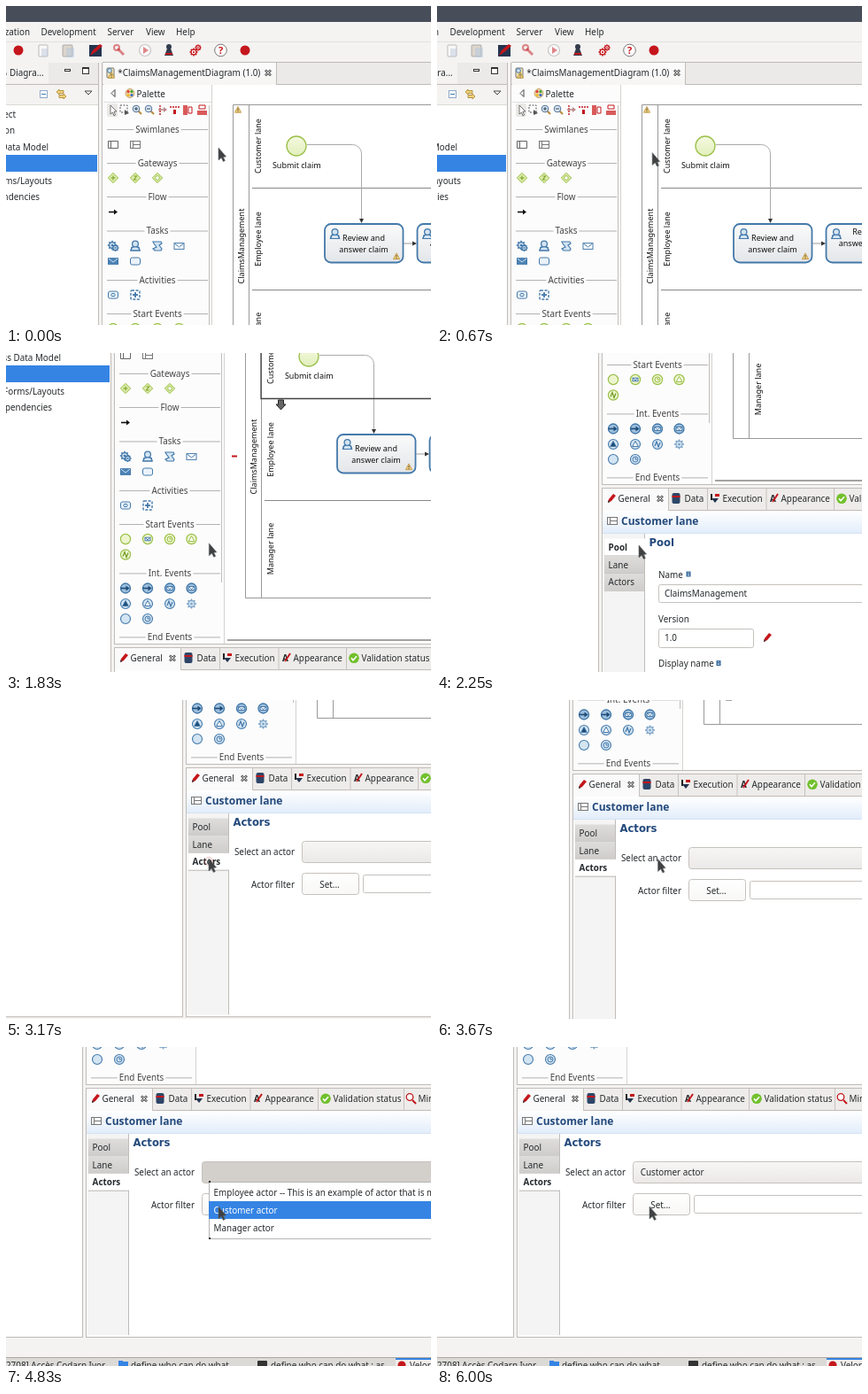
An HTML page with a canvas that plays this animation: 480 px wide and 360 px high, repeating every 6080 ms.

```html
<!DOCTYPE html>
<html lang="en">
<head>
<meta charset="utf-8">
<title>Mapping an actor to a lane</title>
<style>
html, body { margin: 0; width: 100%; height: 100%; overflow: hidden; background: #fff; }
canvas { display: block; }
</style>
</head>
<body>
<canvas id="stage" width="480" height="360"></canvas>
<script>
const g = document.getElementById('stage').getContext('2d');
const LOOP = 6080, SELECT = 1240, ACTORS = 3080, OPEN = 4080, CLOSE = 5080;
const INK = '#262a2d', NAVY = '#244a7c', BLUE = '#3584e4', RED = '#c4161c', EDGE = '#c0bcb8', BG = '#f4f3f2';
const STEEL = '#4479aa', ICE = '#d3e4f2', GREEN = '#9bc04a', LIME = '#edf5cf';

// time, x, y
const camera = [[0, 0, 0], [1250, 46, 0], [1400, 46, 0], [2250, -78, 334], [3000, -95, 410],
  [3300, -95, 410], [4080, 15, 395], [4220, 15, 395], [4800, 18, 440]];
const pointer = [[0, 240, 160], [1150, 285.5, 169], [1350, 285.5, 169], [2250, 150, 551], [2900, 134, 589],
  [3250, 134, 589], [4000, 255, 578], [4190, 255, 578], [4750, 258, 620]];
const clicks = [[SELECT, 1410], [ACTORS, 3240], [3990, OPEN], [4990, CLOSE]];

// monotone cubic through the keys
function at(keys, t, k) {
  const last = keys.length - 1;
  if (t >= keys[last][0]) return keys[last][k];
  const slope = i => (keys[i + 1][k] - keys[i][k]) / (keys[i + 1][0] - keys[i][0]);
  const tangent = i => {
    if (i === 0 || i === last) return 0;
    const a = slope(i - 1), b = slope(i);
    return a * b > 0 ? 2 * a * b / (a + b) : 0;
  };
  let i = 0;
  while (keys[i + 1][0] <= t) i++;
  const h = keys[i + 1][0] - keys[i][0], u = (t - keys[i][0]) / h, v = 1 - u;
  return keys[i][k] * (1 + 2 * u) * v * v + tangent(i) * h * u * v * v
    + keys[i + 1][k] * u * u * (3 - 2 * u) - tangent(i + 1) * h * u * u * v;
}

function box(x, y, w, h, color) { g.fillStyle = color; g.fillRect(x, y, w, h); }

function paint(fill, stroke, width = 1) {
  if (fill) { g.fillStyle = fill; g.fill(); }
  if (stroke) { g.strokeStyle = stroke; g.lineWidth = width; g.stroke(); }
}
function round(x, y, w, h, r, fill, stroke, width) {
  g.beginPath(); g.roundRect(x, y, w, h, r); paint(fill, stroke, width);
}
function dot(x, y, r, fill, stroke, width) {
  g.beginPath(); g.arc(x, y, r, 0, 7); paint(fill, stroke, width);
}
// points relative to x, y
function shape(x, y, pts, fill, stroke, width) {
  g.beginPath();
  for (let i = 0; i < pts.length; i += 2) g.lineTo(x + pts[i], y + pts[i + 1]);
  if (fill) g.closePath();
  paint(fill, stroke, width);
}
function fade(y0, y1, a, b) {
  const f = g.createLinearGradient(0, y0, 0, y1);
  f.addColorStop(0, a); f.addColorStop(1, b);
  return f;
}
// y is the middle of the capitals
function text(s, x, y, { size = 9.9, bold = false, color = INK, align = 'left', face = 'Noto Sans' } = {}) {
  g.font = `${bold ? 'bold ' : ''}${size}px "${face}", sans-serif`;
  g.fillStyle = color;
  g.textAlign = align;
  g.fillText(s, x, y + size * .36);
}
function upright(s, x, y) {
  g.save(); g.translate(x, y); g.rotate(-Math.PI / 2);
  text(s, 0, 0, { size: 9, align: 'center', color: '#111' });
  g.restore();
}

function cross(x, y) {
  shape(x, y, [-3, -3, 3, 3], null, '#444', 2.6); shape(x, y, [-3, 3, 3, -3], null, '#444', 2.6);
  shape(x, y, [-2.6, -2.6, 2.6, 2.6], null, '#fff', 1); shape(x, y, [-2.6, 2.6, 2.6, -2.6], null, '#fff', 1);
}
function gear(x, y, r, color, hub = '#fff') {
  for (let i = 0; i < 8; i++) {
    const a = i * Math.PI / 4;
    shape(x, y, [0, 0, r * Math.cos(a), r * Math.sin(a)], null, color, 1.6);
  }
  dot(x, y, r * .65, hub, color, 1.2); dot(x, y, r * .25, color);
}
function pencil(x, y, color = RED) {
  shape(x, y, [-4, 5, -3, 1, 2, -5, 5, -3, 0, 3], color);
  shape(x, y, [-4, 5, -3.4, 2, -1.5, 4], '#333');
}
function user(x, y) {
  shape(x, y, [-5, 5.5, -4, 2, -1, 1, 1, 1, 4, 2, 5, 5.5], ICE, STEEL, 1.2);
  g.stroke(); dot(x, y - 2, 3.4, ICE, STEEL, 1.3);
}
function warn(x, y) {
  shape(x, y, [0, -3.6, 3.6, 3.2, -3.6, 3.2], '#f3d27a', '#b98f3c', .8);
  box(x - .5, y - 1.5, 1, 2.5, '#554'); box(x - .5, y + 1.6, 1, 1, '#554');
}
function mail(x, y, fill, r = 6) {
  const h = r * .65;
  box(x - r, y - h, 2 * r, 2 * h, STEEL); box(x - r + 1, y - h + 1, 2 * r - 2, 2 * h - 2, fill);
  shape(x, y, [1 - r, 1 - h, 0, 1, r - 1, 1 - h], null, fill === '#fff' ? STEEL : '#cfe2f3');
}
function lanes(x, y) {
  box(x - 6, y - 4, 12, 9, '#777'); box(x - 5, y - 3, 2, 7, '#fff');
  box(x - 2, y - 3, 7, 3, '#fff'); box(x - 2, y + 1, 7, 3, '#fff');
}
function info(x, y) {
  box(x - 2.5, y - 3, 5, 6, '#3c6e9f'); box(x - .5, y - 2, 1, 1, '#fff'); box(x - .5, y, 1, 2, '#fff');
}
function zigzag(x, y, color) { shape(x, y, [-3, 2, -1, -3, 1, 3, 3, -2], null, color, 1.2); }
function clock(x, y, color) { dot(x, y, 3, null, color); shape(x, y, [0, -2, 0, 0, 2, 0], null, color); }
function arrow(x, y, color) {
  shape(x, y, [-5, 0, 3, 0], null, color, 1.6); shape(x, y, [1, -3, 5, 0, 1, 3], color);
}

function menus(on) {
  box(-120, 0, 900, 18, '#474e5a');
  box(-120, 18, 900, 46, BG);
  box(-120, 40, 900, 1, '#e4e1de');
  text('Organization', 27, 29, { align: 'right' });
  [['Development', 39.5], ['Server', 114.5], ['View', 158], ['Help', 192]].forEach(m => text(m[0], m[1], 29));
  dot(14, 50, 5.5, RED);
  g.globalAlpha = .45;
  round(37, 44, 10, 13, 1, '#fff', '#777'); box(40, 48, 7, 9, '#b7c3d8');
  g.globalAlpha = on ? .8 : .5;
  round(64, 44, 11, 13, 1, '#c7b9a5', '#777'); box(68, 47, 9, 11, '#b3c7df');
  g.globalAlpha = 1;
  box(94, 44, 14, 13, '#24344f'); shape(101, 50, [-6, 6, -3, 0, 5, -7, 8, -5, 0, 2], RED);
  g.globalAlpha = on ? 1 : .5;
  shape(128, 50, [-2, -2, 5, 5], null, RED, 3); dot(125, 47, 3, null, RED, 2);
  dot(157, 50, 6.5, '#fff', on ? RED : '#999', 1.2); shape(157, 50, [-2, -4, 4, 0, -2, 4], RED);
  g.globalAlpha = 1;
  shape(184, 50, [-2, -2, 2, -2, 5, 6, -5, 6], '#333c4c'); dot(184, 46, 3, '#333c4c'); box(180, 53, 8, 2, RED);
  gear(212, 52, 4.5, RED); gear(217, 47, 3.5, RED);
  dot(242.5, 50, 6.8, '#fff', '#777'); text('?', 242.5, 50, { bold: true, color: RED, align: 'center', size: 11 });
  dot(270, 50, 5.5, RED);
}

function explorer() {
  box(-120, 64, 225, 704, '#fff');
  box(-120, 64, 225, 25, '#eceae8'); box(-120, 64, 168, 25, BG);
  text('Diagra...', 4, 75); shape(-2, 74, [0, -4, 2, 4], null, '#666', 2);
  box(66, 71, 7, 3, '#333'); box(67, 72, 5, 1, '#fff');
  box(86, 69, 8, 8, '#333'); box(87, 71, 6, 5, '#fff');
  box(-120, 88, 225, 1, EDGE); box(-120, 89, 225, 22, BG); box(-120, 111, 225, 1, '#dcd9d6');
  box(38, 95, 9, 9, '#8ea9c9'); box(39, 96, 7, 7, '#fff'); box(40, 99, 5, 1, STEEL);
  shape(61, 97, [-4, 0, -1, -3, -1, -1.5, 4, -1.5, 4, 1.5, -1, 1.5, -1, 3], '#f2d27a', '#a8802d', .8);
  shape(64, 102, [4, 0, 1, -3, 1, -1.5, -4, -1.5, -4, 1.5, 1, 1.5, 1, 3], '#f2d27a', '#a8802d', .8);
  shape(93, 98, [-4, -2, 4, -2, 0, 2], '#fff', '#444');
  box(-120, 168, 223, 19, BLUE);
  [['Project', 11, 122], ['Organization', 10, 140.5], ['Business Data Model', 48, 159],
    ['Pages/Forms/Layouts', 52, 197], ['Dependencies', 38, 215.5]]
    .forEach(r => text(r[0], r[1], r[2], { align: 'right' }));
  box(104, 64, 1, 704, EDGE); box(-120, 767, 225, 1, EDGE);
}

function heading(s, y) {
  text(s, 171, y, { align: 'center', color: '#444' });
  const half = g.measureText(s).width / 2 + 2;
  box(114, y, 57 - half, 1, '#b2b2b2'); box(171 + half, y, 57 - half, 1, '#b2b2b2');
}

function palette() {
  box(110, 89, 123, 393, '#fcfcfc');
  shape(121, 98.5, [2, -4, -2, 0, 2, 4], '#fff', '#444');
  dot(140, 98.5, 5, '#e8d3a4', '#c9a76d');
  [['#d33', -2, -2], ['#3a3', 2, -2], ['#36c', 2, 2], ['#eb2', -2, 2]].forEach(c => dot(140 + c[1], 98.5 + c[2], 1.5, c[0]));
  text('Palette', 147.5, 99.2);
  box(110, 108, 122, 1, '#e0dedb');
  round(114, 110, 12, 15, 2, '#eae8e5');
  shape(118, 112, [0, 0, 0, 10, 2.5, 8, 4, 12, 5.5, 11, 4, 7, 7, 7], '#fff', '#555', .8);
  g.setLineDash([2, 1.5]); round(129, 112, 8, 8, 0, null, '#555'); g.setLineDash([]);
  shape(134, 117, [0, 0, 0, 6, 5, 4], '#555');
  [148, 162].forEach((x, i) => {
    shape(x, 117, [1, 1, 5, 5], null, '#b88a3c', 2); dot(x - 1, 116, 3.8, '#dceaf7', '#4f6f94');
    box(x - 3, 115.5, 4, 1, '#345'); if (!i) box(x - 1.5, 114, 1, 4, '#345');
  });
  g.setLineDash([2, 1]); shape(174, 112, [0, 0, 0, 11], null, RED, 1.4); shape(185, 114, [0, 0, 11, 0], null, RED, 1.4); g.setLineDash([]);
  arrow(177, 117, '#b88'); box(189, 117, 3, 5, RED);
  box(200, 112, 5, 11, '#d95b5b'); round(206, 114, 4, 7, 0, '#fff', RED);
  box(216, 118, 11, 5, '#d95b5b'); round(218, 112, 7, 4, 0, '#fff', RED);

  heading('Swimlanes', 139);
  round(115.5, 152.5, 11, 8, 0, '#fff', '#666'); box(118, 152, 1, 9, '#666');
  lanes(146, 156);
  heading('Gateways', 177);
  [121, 146, 171].forEach((x, i) => {
    shape(x, 194, [0, -5.7, 5.7, 0, 0, 5.7, -5.7, 0], '#dcebaa', GREEN);
    if (i === 2) dot(x, 194, 2.3, '#fff', GREEN);
    else shape(x, 194, i ? [-1.5, -2, 1.5, -2, -1.5, 2, 1.5, 2] : [-2.5, 0, 2.5, 0], null, '#7da52a', 1.1);
    if (!i) shape(x, 194, [0, -2.5, 0, 2.5], null, '#7da52a', 1.1);
  });
  heading('Flow', 215);
  arrow(121, 232.5, '#111');
  heading('Tasks', 253.5);
  gear(120, 270, 5.2, STEEL, ICE); gear(123.5, 273, 4, STEEL, ICE);
  user(146, 270.5);
  shape(171, 271, [-5, -5, 4, -5, 5, -3, 2, -1, 5, 3, 4, 5, -3, 5, -5, 3, -1, 1, -4, -3], ICE, STEEL, 1.2);
  mail(195.5, 271, '#fff'); mail(121, 288, '#4c83b5');
  round(140.5, 284, 11, 8, 2, '#eaf3fa', STEEL);
  heading('Activities', 309);
  round(115.5, 322, 11, 8, 2, '#eaf3fa', STEEL); round(119, 324.5, 4, 3, 1, null, STEEL);
  g.setLineDash([3, 1.5]); round(141, 321, 10, 10, 1, '#fff', STEEL, 1.4); g.setLineDash([]);
  shape(146, 326, [-3, 0, 3, 0], null, STEEL, 1.8); shape(146, 326, [0, -3, 0, 3], null, STEEL, 1.8);

  heading('Start Events', 347);
  const cols = [121, 146, 171, 195.5];
  cols.forEach(x => dot(x, 364, 5.6, LIME, GREEN, 1.2));
  mail(146, 364, '#fff', 3.5); clock(171, 364, GREEN);
  shape(195.5, 364, [0, -3.5, 3.3, 2.5, -3.3, 2.5], '#fff', GREEN);
  dot(121, 381.5, 5.6, LIME, GREEN, 1.2); zigzag(121, 381.5, '#6f9a20');
  heading('Int. Events', 402.4);
  cols.forEach((x, i) => {
    dot(x, 419.5, 5.5, '#9dbfdd', '#3f75a6', 1.3);
    if (i < 2) arrow(x - .5, 419.5, '#1f4c78'); else mail(x, 419.5, '#fff', 3.8);
    if (i < 3) dot(x, 437, 5.5, ICE, STEEL, 1.1); else gear(x, 437, 5.5, '#7ea4c6', ICE);
    if (i < 2) {
      shape(x, 437, [0, -3.5, 3.3, 2.5, -3.3, 2.5], i ? '#fff' : '#1f4c78', STEEL);
      dot(x, 454, 5.5, ICE, STEEL, 1.1);
    }
  });
  zigzag(171, 437, STEEL); clock(146, 454, STEEL);
  heading('End Events', 474.4);
  box(229, 112, 1, 301, '#c2bfbc');
  box(232, 89, 1, 393, '#d6d3d0');
}

function task(x, w, cx, lines, y) {
  round(x, 246, w, 43.5, 7, fade(246, 290, '#fafafa', '#e3e6e9'), STEEL, 1.8);
  user(x + 11.5, 257);
  lines.forEach((s, i) => text(s, cx, y + 12.8 * i, { size: 9, align: 'center', color: '#111' }));
}

function diagram(t) {
  box(233, 89, 560, 393, '#fff');
  round(256.5, 111.5, 522, 319, 0, '#fff', '#999');
  box(274, 111, 1, 320, '#999');
  box(278, 205, 500, 1, '#888'); box(278, 320, 500, 1, '#888');
  upright('ClaimsManagement', 265.5, 271);
  upright('Customer lane', 284.5, 158);
  upright('Employee lane', 284.5, 263);
  upright('Manager lane', 284.5, 375);
  warn(262, 117);
  g.beginPath(); g.moveTo(340, 156.5); g.lineTo(391, 156.5); g.arcTo(401.5, 156.5, 401.5, 167, 10); g.lineTo(401.5, 242);
  paint(null, '#aaa');
  shape(401.5, 245, [0, 0, -2.5, -5, 2.5, -5], '#333');
  dot(328, 158, 11, fade(147, 169, '#f4f9e0', '#e2efbb'), GREEN, 1.3);
  text('Submit claim', 328.3, 180, { size: 9, align: 'center', color: '#111' });
  task(360, 88.5, 404, ['Review and', 'answer claim'], 261.5);
  warn(441, 282.5);
  shape(449, 268, [0, 0, 11, 0], null, '#999'); shape(464, 268, [0, 0, -5, -2.5, -5, 2.5], '#333');
  task(464.5, 97, 513, ['Read the', 'answer and rate', 'it'], 255);
  if (t >= SELECT) {
    round(274, 111.5, 504, 94, 0, null, '#444', 1.3);
    box(524, 204, 4, 4, '#222');
    shape(296.5, 212, [-3, -5, 3, -5, 3, 0, 5.5, 0, 0, 6, -5.5, 0, -3, 0], '#666', '#222');
    box(241, 269.5, 6, 2, RED);
  }
  // overlay scrollbar, hidden again once the pointer has left
  if (t > 1500 && t < 2700) box(236, 477, 540, 2, '#a5a2a0');
}

function editor(t) {
  box(109, 64, 680, 419, '#fff');
  box(109, 64, 680, 25, '#eceae8'); box(109, 63, 680, 1, EDGE); box(109, 88, 680, 1, EDGE);
  box(110, 64, 196, 25, fade(64, 89, '#fbfbfb', '#f6f5f4')); box(305, 64, 1, 25, EDGE);
  round(114, 70, 8, 11, 1, '#f6e6b4', '#777'); dot(117, 73, 2.4, ICE, STEEL); warn(119, 78);
  text('*ClaimsManagementDiagram (1.0)', 126.3, 75.3);
  cross(296, 75.3);
  palette();
  diagram(t);
  box(108, 64, 1, 419, EDGE); box(109, 482, 680, 1, EDGE);
}

function field(x, y, w, h) { round(x + .5, y + .5, w, h, 2, '#fff', '#c5c1bd'); }

function poolPage() {
  text('Name', 172, 584); info(206, 583.5);
  field(172, 595, 600, 20); text('ClaimsManagement', 179, 605.5);
  text('Version', 172, 634);
  field(172, 645, 107, 21); text('1.0', 179, 655.5); pencil(295, 655);
  text('Display name', 172, 684.5); info(240, 684);
  field(172, 695, 600, 20);
}

function actorsPage(t, py) {
  const open = t >= OPEN && t < CLOSE;
  text('Select an actor', 231, 581.5, { align: 'right' });
  round(239.5, 569.5, 540, 24, 3, open ? '#d3cfcb' : fade(569, 594, '#f7f6f5', '#ebe9e7'), '#c5c1bd');
  if (t >= CLOSE) text('Customer actor', 247.7, 581.5);
  text('Actor filter', 231, 618, { align: 'right' });
  round(239.5, 605.5, 64, 24, 3, fade(605, 630, '#fff', '#f8f7f6'), '#c5c1bd');
  text('Set...', 270.5, 618, { align: 'center' });
  field(308, 607, 470, 20);
  if (!open) return;
  box(247, 592, 540, 65, '#b5b5b5'); box(248, 593, 540, 63, '#fff');
  box(247, 591, 2, 2, '#111'); box(247, 655, 2, 2, '#111');
  const row = py > 614 ? 1 : 0;
  box(247, 594 + 20 * row, 541, 20, BLUE);
  ['Employee actor -- This is an example of actor that is mapped by default', 'Customer actor', 'Manager actor']
    .forEach((s, i) => text(s, 252.6, 604 + 20.2 * i, { color: i === row ? '#fff' : INK }));
}

function properties(t, py) {
  const actors = t >= ACTORS;
  box(108, 486, 680, 282, '#fff');
  box(108, 486, 680, 26, '#eeecea'); box(109, 487, 74, 25, '#fafafa');
  box(108, 486, 680, 1, EDGE); box(183, 511, 600, 1, EDGE);
  [183, 227, 293.5, 370, 467].forEach(x => box(x, 487, 1, 25, '#c5c1bd'));
  [['General', 126.5], ['Data', 201.5], ['Execution', 244.5], ['Appearance', 310.5], ['Validation status', 387.5], ['Minimap', 483.5]]
    .forEach(s => text(s[0], s[1], 498.3));
  pencil(119, 498); cross(174, 498.3);
  round(187.5, 492, 9, 12, 2, '#2d4668'); box(187.5, 495, 9, 2, RED);
  shape(232, 498, [0, -5, 0, 2], null, '#222', 2); shape(236, 498, [-4, 0, 4, 0, 0, 5], '#24344f'); box(236, 493, 5, 3, RED);
  text('A', 298, 498.3, { bold: true }); shape(304, 498, [-3, 4, 3, -5], null, RED, 2);
  dot(379, 498.3, 5.8, '#72c02c'); shape(379, 498.3, [-3, 0, -1, 2.5, 3, -2], null, '#fff', 1.6);
  dot(474, 496.5, 3.8, '#fff', RED, 1.3); shape(477, 500, [0, 0, 4, 4], null, RED, 2);

  box(109, 512, 680, 26, fade(512, 538, '#fff', '#e1ecfa')); box(109, 537, 680, 1, '#d5e2f2');
  lanes(120, 523);
  text('Customer lane', 130, 524, { size: 12, bold: true, color: NAVY });

  box(110, 538, 47, 227, '#f5f4f4'); box(156, 538, 1, 227, EDGE);
  ['Pool', 'Lane', 'Actors'].forEach((s, i) => {
    const y = 543.5 + 19.6 * i, sel = i === (actors ? 2 : 0);
    box(111, y, sel ? 46 : 45, 19, sel ? '#fff' : fade(y, y + 19, '#dedddc', '#cfcdcb'));
    box(111, y + 19, 46, 1, '#bcb9b6');
    text(s, 115.6, y + 10, { bold: sel });
  });
  text(actors ? 'Actors' : 'Pool', 161.5, 547.8, { size: 11.6, bold: true, color: NAVY, face: 'DejaVu Sans' });
  actors ? actorsPage(t, py) : poolPage();
  box(108, 486, 1, 282, EDGE); box(108, 767, 680, 1, EDGE);
}

function taskbar() {
  box(-120, 790, 900, 30, '#dcdad7'); box(-120, 790, 900, 1, '#aaa7a4');
  text('2708] Accès Codarn Ivor', 130, 799.5, { align: 'right' });
  box(145, 795, 11, 9, BLUE); box(145, 794, 5, 2, BLUE);
  text('define who can do what...', 159, 799.5);
  round(302, 794, 11, 11, 1, '#333'); text('define who can do what : as...', 317, 799.5);
  box(458, 791, 200, 20, '#efedeb'); box(458, 791, 200, 2, BLUE);
  dot(465, 799, 4.5, RED); text('Velora Studio', 474, 799.5);
}

function draw(now) {
  const t = Math.floor((now % LOOP + 5) * .012) * 1000 / 12;
  const px = at(pointer, t, 1), py = at(pointer, t, 2);
  g.setTransform(1, 0, 0, 1, 0, 0);
  box(0, 0, 480, 360, BG);
  g.translate(-Math.round(at(camera, t, 1)), -Math.round(at(camera, t, 2)));
  menus(t >= SELECT);
  explorer();
  editor(t);
  properties(t, py);
  taskbar();
  if (clicks.some(c => t >= c[0] && t < c[1])) dot(px, py + 3, 4.5, null, 'rgba(225,80,80,.4)');
  shape(px, py, [0, 0, 0, 14, 3.2, 11.2, 5.4, 15.5, 7.4, 14.5, 5.4, 10.4, 8.6, 10], '#3f4143', '#66686a', .6);
  requestAnimationFrame(draw);
}
requestAnimationFrame(() => draw(0));
</script>
</body>
</html>
```
